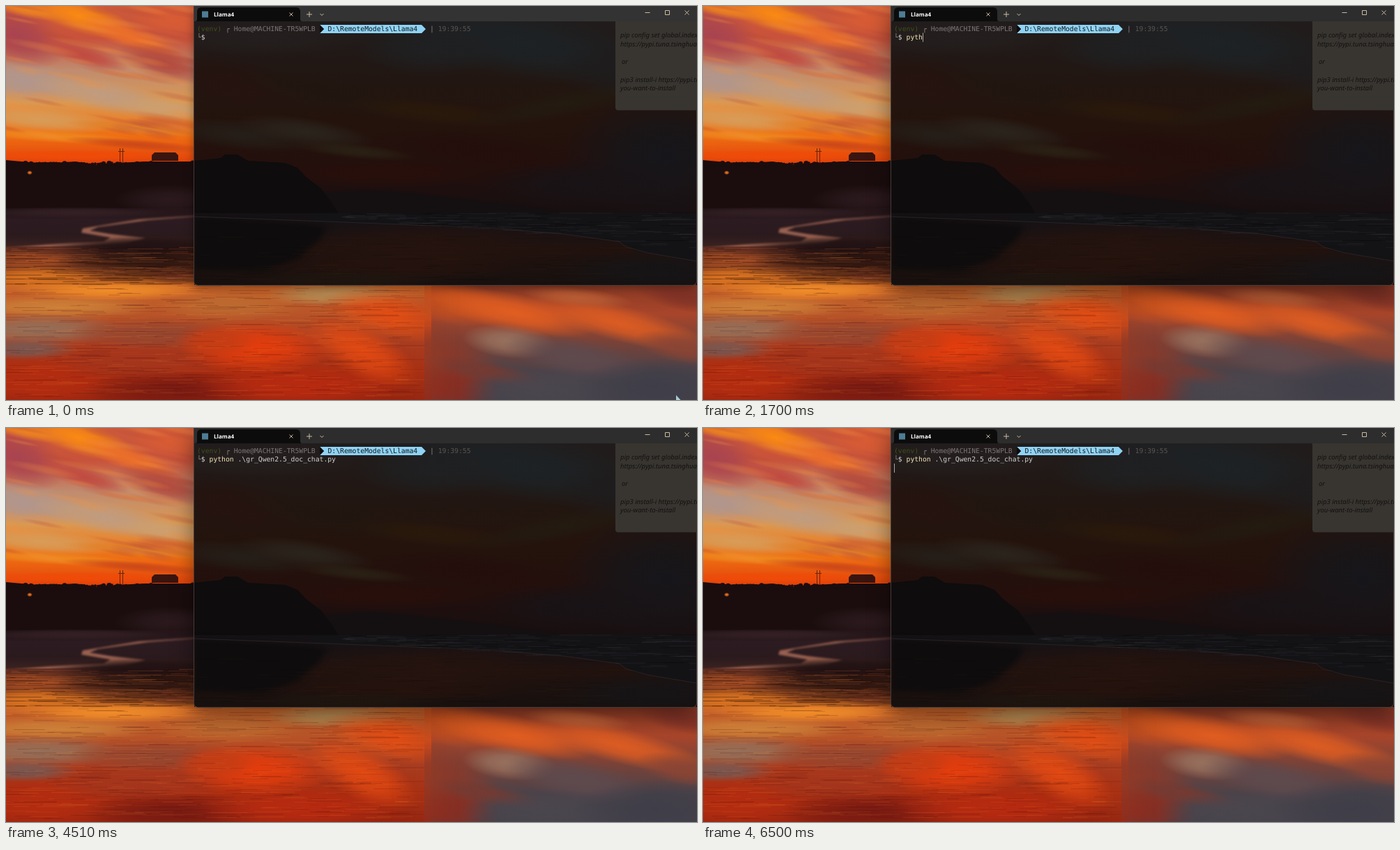
An HTML page with a canvas that plays this animation: 991 by 565 pixels, repeating every 8 s.

```html
<!DOCTYPE html>
<html lang="en">
<head>
<meta charset="utf-8">
<title>Terminal over a sunset beach</title>
<style>
html, body { margin: 0; width: 100%; height: 100%; overflow: hidden; background: #1a0a0a; }
canvas, svg, #win { position: absolute; left: 0; top: 0; }
#win { left: 269px; width: 722px; height: 401px; box-sizing: border-box; border: 1px solid #453b39;
  border-top: 0; border-radius: 0 0 6px 6px; box-shadow: 0 8px 32px rgba(0,0,0,.45); }
#win.idle { box-shadow: 0 3px 14px rgba(0,0,0,.35); }
text { white-space: pre; text-rendering: geometricPrecision; }
.mono { font: 9.73px "DejaVu Sans Mono", monospace; }
.note { font: italic 9.5px "Noto Sans", "Open Sans", sans-serif; fill: #121110; }
.tab { font: 600 8px "Noto Sans", "Open Sans", sans-serif; fill: #fff; }
.line { fill: none; stroke: #dccab0; stroke-width: .9; }
</style>
</head>
<body>
<canvas id="photo" width="991" height="565"></canvas>
<div id="win"></div>
<svg width="991" height="565" viewBox="0 0 991 565">
  <path id="bar" d="M270 0H991V22H270Z"/>
  <path d="M271 22q3 0 3-3V8q0-6 6-6H416q6 0 6 6V19q0 3 3 3Z" fill="#0c0c0c"/>
  <rect x="281" y="7.5" width="9" height="9" fill="#4d7c94"/>
  <text class="tab" x="298" y="15.4">Llama4</text>
  <path class="line" d="M406.500 9.500l5 5m0-5l-5 5M431 12h8m-4-4v8M450.500 11l2.500 2.500 2.500-2.500"/>
  <path class="line" d="M916.500 9.500h7M945.500 6.500h6v6h-6zM973.500 6.500l6 6m0-6l-6 6"/>

  <path d="M874 22H991V149.500H878q-4 0-4-4Z" fill="#383530"/>
  <g class="note">
    <text x="881" y="45">pip config set global.index-url</text>
    <text x="881" y="58">https://pypi.tuna.tsinghua.edu.cn</text>
    <text x="883" y="83">or</text>
    <text x="881" y="108.500">pip3 install-i https://pypi.tuna</text>
    <text x="881" y="121">you-want-to-install</text>
  </g>

  <path d="M450 27H596L602 33 596 39H450L456 33Z" fill="#8fd3f5"/>
  <path d="M450 27L456 33 450 39Z" fill="#0c0c0c"/>
  <g class="mono">
    <text x="274" y="36.200" fill="#404f1a">(venv)</text>
    <text x="315" y="36.200" fill="#99918e">┌</text>
    <text x="326.700" y="36.200" fill="#7d7676">Home@MACHINE-TR5WPLB</text>
    <text x="461.500" y="36.200" fill="#10181c">D:\RemoteModels\Llama4</text>
    <text x="608" y="36.200" fill="#8c8683">|</text>
    <text x="619.700" y="36.200" fill="#5b5553">19:39:55</text>
    <text x="274" y="48.400" fill="#99918e">└<tspan fill="#d8d8d8">$ </tspan><tspan id="cmd" fill="#efe5b4"></tspan><tspan id="args" fill="#d0d0d0"></tspan></text>
  </g>
  <rect id="caret" width="1" height="13" fill="#a8a4a0"/>
  <path id="pointer" d="M961 558V565H967.500Z" fill="#a9cdd6"/>
</svg>
<script>
const start = performance.now();
const $ = id => document.getElementById(id);
const ctx = $('photo').getContext('2d');

let seed = 7;
const rnd = () => (seed = seed * 16807 % 2147483647) / 2147483647;

// soft elliptical patch of one colour
function blob(x, y, rx, ry, color, turn = 0) {
  ctx.save();
  ctx.translate(x, y);
  ctx.rotate(turn);
  ctx.scale(rx, ry);
  const g = ctx.createRadialGradient(0, 0, 0, 0, 0, 1);
  g.addColorStop(0, color);
  g.addColorStop(.45, color + 'c0');
  g.addColorStop(1, color + '00');
  ctx.fillStyle = g;
  ctx.fillRect(-1, -1, 2, 2);
  ctx.restore();
}

function fade(x, y, w, h, ...colors) {
  const g = ctx.createLinearGradient(0, y, 0, y + h);
  colors.forEach((c, i) => g.addColorStop(i / (colors.length - 1), c));
  ctx.fillStyle = g;
  ctx.fillRect(x, y, w, h);
}

function shape(path, color, blur = 0) {
  ctx.filter = blur ? `blur(${blur}px)` : 'none';
  ctx.fillStyle = color;
  ctx.fill(new Path2D(path));
  ctx.filter = 'none';
}

function clipTo(path, draw) {
  ctx.save();
  ctx.clip(new Path2D(path));
  draw();
  ctx.restore();
}

function ripples(n, x, y, w, h, dark, light) {
  for (let i = 0; i < n; i++) {
    ctx.fillStyle = i % 2 ? dark : light;
    ctx.fillRect(x + rnd() * w, y + rnd() * h, 12 + rnd() * 55, .5 + rnd() * .8);
  }
}

function sky() {
  fade(0, 0, 270, 230, '#cc5a3a', '#c8523a', '#c08c70', '#dc9850', '#ee7014', '#e23c08');
  blob(15, 42, 75, 42, '#a84450', .4);
  blob(105, 14, 85, 24, '#fa8a12', .3);
  blob(30, 5, 60, 12, '#ee8420', .2);
  blob(180, 45, 80, 18, '#ec702a', .35);
  blob(235, 18, 60, 26, '#d85c34', .2);
  blob(110, 70, 70, 16, '#c04a40', .3);
  blob(225, 82, 70, 24, '#b0483e', .3);
  blob(25, 108, 90, 30, '#b0968e', .15);
  blob(140, 128, 110, 24, '#c09c80', .2);
  blob(235, 148, 80, 16, '#cca070', .1);
  blob(50, 163, 110, 18, '#d89c58', .08);
  blob(190, 175, 110, 9, '#e08028', .08);
  blob(70, 187, 130, 9, '#ee881e', .06);
  blob(190, 199, 110, 8, '#cc4818', .08);
  blob(100, 214, 150, 8, '#f04a08');
  ctx.globalAlpha = .3;
  for (let i = 0; i < 60; i++)
    blob(rnd() * 270, rnd() * 190, 25 + rnd() * 35, 3 + rnd() * 4, i % 2 ? '#f09040' : '#b84a38', .2);
  ctx.globalAlpha = 1;
}

function shore() {
  fade(0, 285, 270, 65, '#1b0f12', '#2c1b20', '#2a1a1e', '#40241f');
  shape('M0 221L22 223 55 226 100 223 130 228 160 225 200 223H270V290H0Z', '#1b0d0e');
  for (let i = 0; i < 68; i++) {
    ctx.beginPath();
    ctx.arc(i * 4, 225 + rnd() * 3, 1.5 + rnd() * 2.5, 0, 7);
    ctx.fill();
  }
  shape('M209 222V214L213 210H243L247 214V222Z', '#3a1510');
  shape('M163 204h1v20h-1ZM167 204h1v20h-1ZM161 208h9v1h-9Z', '#6a2410');
  blob(235, 278, 80, 22, '#2b191d');
  blob(34, 239, 4, 3, '#ff7a20');
  blob(100, 296, 140, 8, '#342024');
  shape('M270 302L205 307 132 317 120 322 150 327 200 333 170 341 70 345 0 354V347L60 342 140 338 150 332 108 325 110 319 190 306 270 301Z', '#98604f', 1.5);
}

function water() {
  fade(0, 345, 270, 60, '#5a2a20', '#7a3a1e', '#c0641e');
  fade(0, 400, 991, 165, '#c8662a', '#b85428', '#a83c20', '#a82c10', '#942410');
  blob(215, 360, 150, 34, '#26130f');
  blob(200, 345, 130, 14, '#211214');
  blob(30, 365, 80, 16, '#a04a22');
  blob(45, 390, 100, 18, '#dc7420');
  blob(150, 408, 140, 15, '#f08c28');
  blob(245, 386, 50, 14, '#5c2a1a');
  blob(70, 432, 150, 18, '#cc8038');
  blob(45, 464, 130, 24, '#94705a');
  blob(25, 492, 80, 16, '#785a54');
  blob(210, 470, 120, 24, '#944630');
  blob(50, 540, 120, 38, '#b42c10');
  blob(190, 512, 130, 26, '#a4351c');
  blob(240, 552, 130, 30, '#781a12');
  blob(320, 430, 110, 22, '#bc6a30');
  blob(470, 414, 100, 18, '#b08a54');
  blob(360, 490, 110, 40, '#e43c0c');
  blob(300, 480, 60, 24, '#c43c14');
  blob(420, 545, 150, 30, '#b82a10');
  blob(560, 445, 110, 34, '#e04c14', .2);
  blob(510, 495, 90, 38, '#e04812', .5);
}

// grey and slate reflections right of the glow
function clouds() {
  fade(610, 400, 381, 165, '#8a3a24', '#a8452a', '#784238', '#4c4248', '#45414a');
  blob(620, 420, 110, 34, '#c8521e', .2);
  blob(620, 510, 90, 60, '#8c3828', .3);
  blob(620, 550, 90, 40, '#8a2c20');
  blob(730, 440, 120, 28, '#e25e20', .2);
  blob(880, 455, 140, 26, '#dc5c22', .25);
  blob(820, 418, 80, 14, '#b85c34', .1);
  blob(970, 415, 70, 22, '#803226', .2);
  blob(970, 490, 70, 22, '#8a4434', .2);
  blob(722, 481, 68, 24, '#98725f', .1);
  blob(820, 505, 110, 30, '#5e4a4e', .2);
  blob(690, 525, 90, 16, '#743a32', .2);
  blob(780, 550, 130, 32, '#4a464e');
  blob(930, 545, 120, 40, '#3f3e48');
}

// the same landscape, seen through the dark terminal
function dimScene() {
  fade(270, 22, 721, 280, '#211c1c', '#211713', '#24130d', '#230f0c', '#160f11');
  blob(370, 45, 150, 26, '#241e1e');
  blob(740, 55, 210, 50, '#1d2225', .15);
  blob(610, 60, 110, 40, '#1f2022');
  blob(320, 110, 110, 40, '#25130f', .2);
  blob(460, 125, 130, 22, '#21160f', .2);
  blob(340, 185, 110, 22, '#251e18', .1);
  blob(430, 180, 100, 20, '#2a241c', .15);
  blob(500, 208, 90, 11, '#2a2114', .1);
  blob(610, 152, 120, 18, '#29190b', .1);
  blob(670, 205, 150, 26, '#240e0b', .1);
  blob(540, 240, 160, 20, '#280f0b');
  blob(800, 140, 150, 20, '#231a10', -.2);
  blob(900, 90, 110, 45, '#1e1c1d');
  blob(945, 215, 150, 90, '#16161a');
  blob(830, 255, 150, 35, '#181316');
  shape('M455 268L520 264 570 267 640 275 720 285 790 294 800 304H455Z', '#141012', 1);
  shape('M270 222L308 218 314 213H332L347 222 400 225 418 232 430 245 452 262 466 280 480 302H270Z', '#0e0c0d');
  fade(270, 297, 721, 104, '#141215', '#1a1213', '#21120e', '#1c110e', '#16100e');
  blob(600, 345, 190, 35, '#24130e');
  blob(560, 375, 190, 22, '#24120d');
  blob(490, 392, 140, 14, '#1f150f');
  blob(930, 380, 150, 30, '#161416');
  shape('M270 303L380 308 462 315 450 334 420 362 370 380 270 378Z', '#0e0c0d', 4);
  shape('M440 297H991V366L905 352 880 338 800 327 700 319 560 313 440 310Z', '#131316');
  ctx.strokeStyle = '#2a2222';
  ctx.stroke(new Path2D('M270 302L380 306 560 313 700 319 800 327 880 338 888 345 920 354 991 366'));
  for (let i = 0; i < 150; i++) {
    ctx.fillStyle = i % 3 ? 'rgba(80,76,82,.16)' : 'rgba(0,0,0,.25)';
    const x = 480 + rnd() * 500;
    ctx.fillRect(x, 296 + rnd() * (8 + (x - 480) * .09), 10 + rnd() * 45, 1);
  }
  ripples(130, 260, 330, 600, 70, 'rgba(0,0,0,.15)', 'rgba(120,60,35,.07)');
}

clipTo('M0 0H270V230H0Z', sky);
shore();
water();
ripples(240, -30, 345, 300, 55, 'rgba(35,12,10,.35)', 'rgba(220,110,50,.2)');
ripples(600, -30, 400, 600, 160, 'rgba(70,14,10,.2)', 'rgba(255,140,50,.13)');
clipTo('M600 400H991V565H600Z', clouds);
shape('M580 400H620V565H580Z', '#a8402040', 14);
clipTo('M270 0H991V394q0 6-6 6H276q-6 0-6-6Z', dimScene);

// start time, command, arguments, caret position
const steps = [
  [0, '', ''],
  [500, 'pyth', '', 315, 38.5],
  [2500, 'python', ' gr_', 350, 38.5],
  [4510, 'python', ' .\\gr_Qwen2.5_doc_chat.py'],
  [6500, 'python', ' .\\gr_Qwen2.5_doc_chat.py', 274, 51]
];

let shown;
function tick() {
  const t = (performance.now() - start) % 8000;
  const step = steps.findLast(s => s[0] <= t);
  if (step !== shown) {
    shown = step;
    const [from, cmd, args, x = -9, y = 0] = step;
    const idle = from === 0;
    $('cmd').textContent = cmd;
    $('args').textContent = args;
    $('caret').setAttribute('x', x);
    $('caret').setAttribute('y', y);
    $('bar').setAttribute('fill', idle ? '#333333' : '#2d2d2d');
    $('win').className = idle ? 'idle' : '';
    $('pointer').style.display = idle ? '' : 'none';
  }
  requestAnimationFrame(tick);
}
tick();
</script>
</body>
</html>
```
